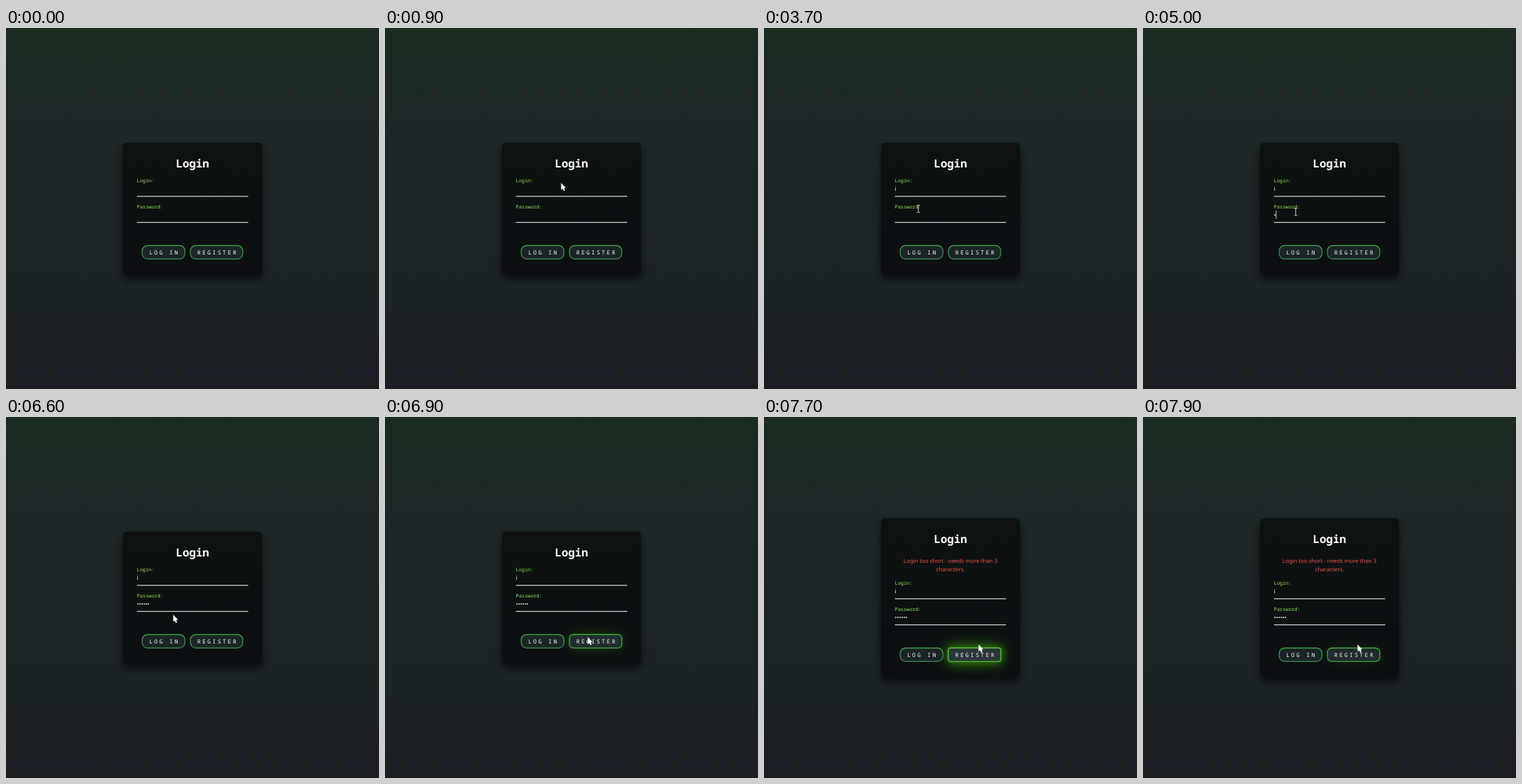
Animation, 526 px wide and 510 px high, one loop 8000 ms. Source, as an HTML page:

```html
<!DOCTYPE html>
<html lang="en">
<head>
<meta charset="utf-8">
<title>Login form</title>
<style>
  html, body { margin: 0; width: 100%; height: 100%; overflow: hidden; background: #1c2425; }
  svg { display: block; width: 526px; height: 510px; }
  text {
    font-family: "Noto Sans", sans-serif; font-size: 7.85px; fill: #fff;
    white-space: pre; text-rendering: geometricPrecision;
  }
  .mono { font-family: "Noto Sans Mono", monospace; }
  .title { font-size: 15.7px; font-weight: 700; text-anchor: middle; }
  .label { font-size: 6.87px; fill: #8cea58; }
  .btn { letter-spacing: 2.45px; }
  .error { fill: #f2524a; text-anchor: middle; }
  .line { fill: #d4d6d6; }
  .button { fill: #1c2526; stroke: url(#edge); stroke-width: 1.2px; }
</style>
</head>
<body>
<svg viewBox="0 0 526 510">
  <defs>
    <linearGradient id="bg" x2="0" y2="1">
      <stop offset="0" stop-color="#1b2c20"/>
      <stop offset=".2" stop-color="#1c2726"/>
      <stop offset=".75" stop-color="#1c2326"/>
      <stop offset="1" stop-color="#1b1d23"/>
    </linearGradient>
    <linearGradient id="cardFill" x2="0" y2="1">
      <stop offset="0" stop-color="#0e1211"/>
      <stop offset="1" stop-color="#0d0f12"/>
    </linearGradient>
    <linearGradient id="edge" x2="0" y2="1">
      <stop offset="0" stop-color="#3cae4a"/>
      <stop offset="1" stop-color="#3f8b52"/>
    </linearGradient>
    <filter id="soft" x="-30%" y="-30%" width="160%" height="160%"><feGaussianBlur stdDeviation="6.1"/></filter>
    <filter id="near" x="-50%" y="-100%" width="200%" height="300%"><feGaussianBlur stdDeviation="1.3"/></filter>
    <filter id="mid" x="-50%" y="-150%" width="200%" height="400%"><feGaussianBlur stdDeviation="6.1"/></filter>
    <filter id="far" x="-100%" y="-300%" width="300%" height="700%"><feGaussianBlur stdDeviation="12.2"/></filter>
  </defs>
  <rect width="526" height="510" fill="url(#bg)"/>
  <rect id="shadow" x="165" width="196" rx="5" opacity=".6" filter="url(#soft)"/>
  <rect id="card" x="165" width="196" rx="5" fill="url(#cardFill)"/>

  <g id="head">
    <text class="mono title" x="263" y="197.2">Login</text>
    <g id="error" class="error">
      <text class="error" x="263" y="225.2">Login too short - needs more than 3</text>
      <text class="error" x="263" y="236.8">characters.</text>
    </g>
  </g>

  <g id="form">
    <text class="mono label" x="184.6" y="218">Login:</text>
    <rect class="line" x="184.6" y="237.2" width="156.9" height="1.2"/>
    <text class="mono label" x="184.6" y="254.8">Password:</text>
    <rect class="line" x="184.6" y="274" width="156.9" height="1.2"/>
    <text id="login" x="184.6" y="230.2"></text>
    <text id="pass" x="184.6" y="267"></text>
    <rect id="caret" width=".9" height="12" fill="#d0d3d3"/>

    <g id="glow" fill="#4fe206">
      <rect x="259.5" y="306.7" width="75" height="20" rx="2.5" opacity=".8" filter="url(#far)"/>
      <rect x="259.5" y="306.7" width="75" height="20" rx="2.5" filter="url(#mid)"/>
      <rect x="259.5" y="306.7" width="75" height="20" rx="2.5" filter="url(#near)"/>
    </g>
    <rect class="button" x="192.1" y="307.3" width="60.2" height="19" rx="7.5"/>
    <text class="mono btn" x="201.9" y="319.9">LOG IN</text>
    <rect id="register" class="button" x="260.1" y="307.3" width="73.8" height="19"/>
    <rect id="hover" x="260.1" y="307.3" width="73.8" height="19" fill="#303c40" stroke="#4fc92a" stroke-width="1.2"/>
    <text class="mono btn" x="269.8" y="319.9">REGISTER</text>
  </g>

  <path id="arrow" d="M0 0V10L2.2 8.2 3.7 11.6 5.5 10.8 4.2 7.6 6.7 7.2Z" fill="#fff"/>
  <path id="beam" d="M-2-5.2Q0-5.2 0-4Q0-5.2 2-5.2M0-4V4M-2 5.2Q0 5.2 0 4Q0 5.2 2 5.2" fill="none" stroke="#e8eaea" stroke-width=".9"/>
</svg>
<script>
const LOOP = 8000, STEP = 100;
const LEFT = 184.6, I_WIDTH = 2, DOT = 2.95;
const ENTER = { x: 491.5, y: 322 };

// Pointer moves: each eases from wherever the last one ended
const moves = [
  { at: 300, ms: 100, x: 449.5, y: 302 },
  { at: 500, ms: 500, x: 240, y: 215.3 },
  { at: 1400, ms: 200, x: 236.8, y: 215.3 },
  { at: 2000, ms: 100, x: 236.8, y: 221.3 },
  { at: 3400, ms: 450, x: 215.3, y: 259.7 },
  { at: 6400, ms: 200, x: 235.8, y: 279.3 },
  { at: 6600, ms: 600, x: 302.6, y: 321.2 }
];
const keyTimes = [5000, 5100, 5300, 5700, 5900, 6000];

const $ = id => document.getElementById(id);
const set = (id, attrs) => {
  for (const k in attrs) $(id).setAttribute(k, attrs[k]);
};
const show = (id, on) => set(id, { visibility: on ? "visible" : "hidden" });
const mix = (a, b, p) => a + (b - a) * p;
const ramp = (t, from, ms) => Math.min(1, Math.max(0, (t - from) / ms));
const easeOut = p => 1 - (1 - p) ** 2;

function pointerAt(t) {
  return moves.reduce((pos, m) => {
    const p = easeOut(ramp(t, m.at, m.ms));
    return { x: mix(pos.x, m.x, p), y: mix(pos.y, m.y, p) };
  }, ENTER);
}

function draw(now) {
  const t = Math.floor(now % LOOP / STEP) * STEP;
  const within = (a, b) => t >= a && t < b;

  // The error message makes the centred card taller
  const failed = t >= 7700, grow = failed ? 19 : 0;
  const box = { y: 162 - grow, height: 186 + 2 * grow };
  set("card", box);
  set("shadow", { y: box.y + 7.4, height: box.height });
  set("head", { transform: `translate(0 ${-grow})` });
  set("form", { transform: `translate(0 ${grow})` });
  show("error", failed);

  const typed = t >= 3000, dots = keyTimes.filter(k => t >= k).length;
  $("login").textContent = typed ? "i" : "";
  $("pass").textContent = "•".repeat(dots);

  const inPass = t >= 4100;
  show("caret", within(2100, 3300) || within(4100, 6500));
  set("caret", {
    x: LEFT - .2 + (inPass ? dots * DOT : typed ? I_WIDTH : 0),
    y: inPass ? 257.7 : 221
  });

  const hover = easeOut(ramp(t, 6800, 500)) * (1 - ramp(t, 7600, 400));
  const rx = mix(7.5, 2, hover);
  set("glow", { opacity: hover * hover });
  set("register", { rx });
  set("hover", { opacity: hover, rx });

  const { x, y } = pointerAt(t), beam = within(3000, 6500);
  const at = { transform: `translate(${x} ${y})` };
  set("arrow", at);
  set("beam", at);
  show("arrow", t >= 300 && !beam);
  show("beam", beam);
}

const start = performance.now();
function tick() {
  draw(performance.now() - start);
  requestAnimationFrame(tick);
}
tick();
</script>
</body>
</html>
```
